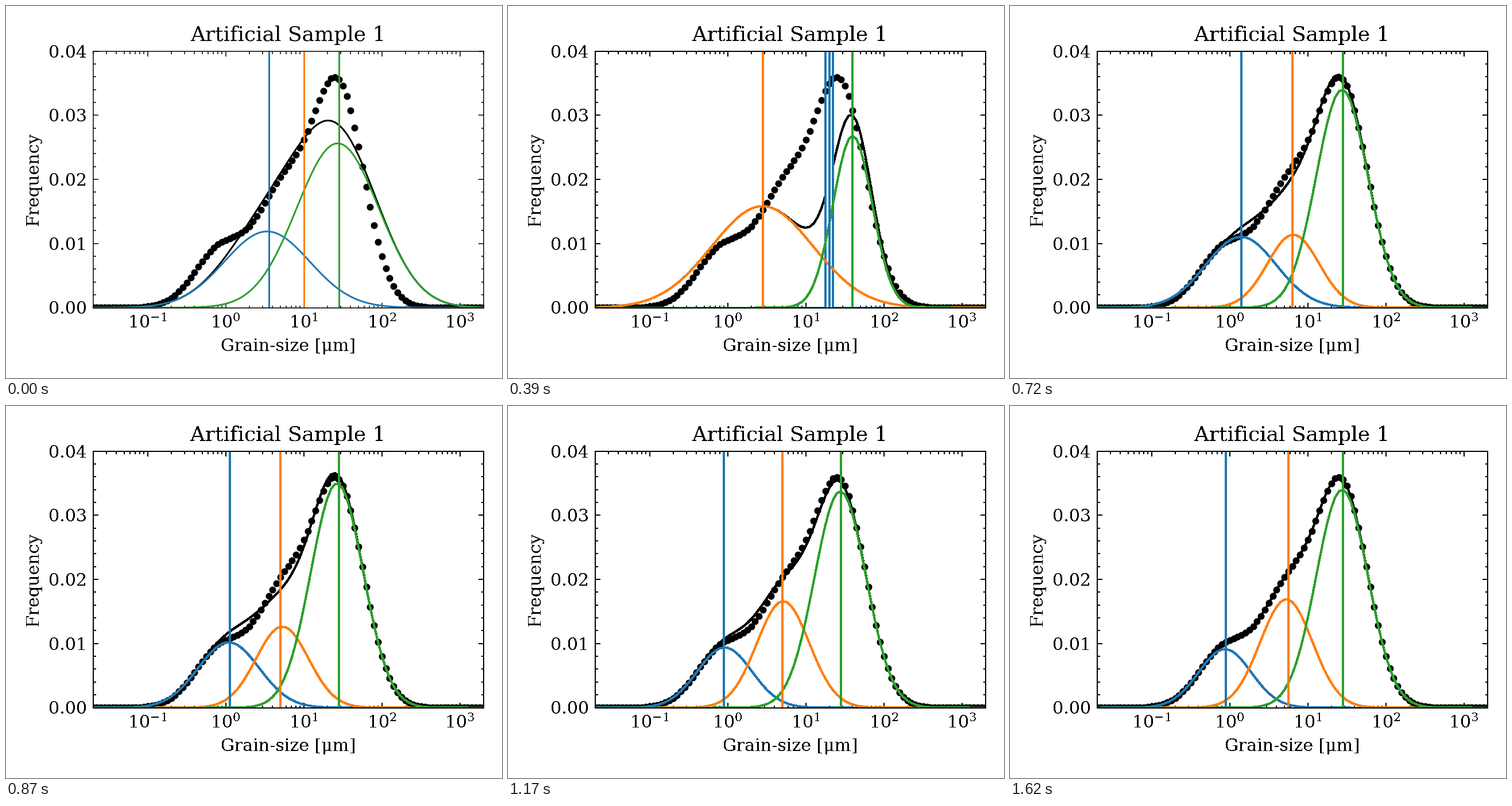
Animation of 864x648 px, one loop 1710 ms. Source, as a matplotlib script:

```python
import matplotlib.pyplot as plt
import numpy as np
from matplotlib.animation import FuncAnimation
from matplotlib.ticker import AutoMinorLocator, MultipleLocator

W, H, DPI = 864, 648, 216
STEPS, HOLD, INTERVAL = 55, 2, 30
COLORS = ["#1f77b4", "#ff7f0e", "#2ca02c"]

plt.rcParams.update({
    "font.family": "DejaVu Serif",
    "mathtext.fontset": "dejavuserif",
    "font.size": 10,
    "axes.linewidth": 0.5,
    "lines.linewidth": 1.0,
})
for axis, far in (("xtick", "top"), ("ytick", "right")):
    plt.rcParams.update({
        f"{axis}.direction": "in",
        f"{axis}.{far}": True,
        f"{axis}.minor.visible": True,
        f"{axis}.major.size": 3,
        f"{axis}.minor.size": 1.5,
        f"{axis}.major.width": 0.5,
        f"{axis}.minor.width": 0.5,
    })

# Grain-size classes: 20 per decade; centres and spreads count classes.
index = np.arange(101)
sizes = 0.02 * 10 ** (index / 20)


def guess(centres, spreads, first, last):
    """Three components; the middle one takes the remaining weight."""
    return np.array([centres, spreads, (first, 1 - first - last, last)])


START = guess((44.6, 54, 62.7), (10.9, 6.4, 10.5), 0.325, 0.675)
WIDE = guess((42.35, 54, 60.9), (18.4, 6.4, 8.7), 0.468, 0.532)
SPIKE = guess((60, 42.9, 66), (0.06, 12.95, 5), 0.15, 0.336)
ROUGH = guess((41.25, 53.65, 63.9), (11.4, 6.4, 6.2), 0.35, 0.458)
FINAL = guess((32.72, 48.5, 62.79), (6.69, 6.7, 6.6), 0.1525, 0.5625)

SEARCH_STEPS = [0, 6, 13, 19]
SEARCH = [START, WIDE, SPIKE, ROUGH]


def state(step):
    """Search through the guesses, then settle with a damped swing."""
    if step <= SEARCH_STEPS[-1]:
        i = max(np.searchsorted(SEARCH_STEPS, step), 1)
        a, b = SEARCH_STEPS[i - 1:i + 1]
        t = (step - a) / (b - a)
        return (1 - t) * SEARCH[i - 1] + t * SEARCH[i]
    t = step - SEARCH_STEPS[-1]
    swing = np.exp(-t / 7) * np.cos(np.arange(3) * np.pi * t / 20)
    fit = FINAL + (ROUGH - FINAL) * swing
    return guess(fit[0], fit[1], fit[2, 0], fit[2, 2])


def component(centre, spread, weight):
    z = (index - centre) / spread
    return weight * np.exp(-z * z / 2) / (spread * np.sqrt(2 * np.pi))


fig = plt.figure(figsize=(W / DPI, H / DPI), dpi=DPI, facecolor="white")
ax = fig.add_axes([151.5 / W, 1 - 525.5 / H, 680 / W, 446.7 / H])
ax.set_xscale("log")
ax.set_xlim(0.02, 2000)
ax.set_ylim(0, 0.04)
ax.yaxis.set_major_locator(MultipleLocator(0.01))
ax.yaxis.set_minor_locator(AutoMinorLocator(5))
ax.yaxis.set_major_formatter("{x:.2f}")
ax.set_title("Artificial Sample 1")
ax.set_xlabel("Grain-size [μm]")
ax.set_ylabel("Frequency")

sample = sum(component(*p) for p in FINAL.T)
dots, = ax.plot(sizes, sample, "o", color="black", ms=3, mew=1)
total, = ax.plot(sizes, sample, color="black")
curves = [ax.plot(sizes, 0 * sizes, color=c)[0] for c in COLORS]
modes = [ax.axvline(1, color=c) for c in COLORS]


def set_edges(hard):
    """Smooth strokes at first, hard-edged ones afterwards."""
    frame_width = 2 / 3 if hard else 0.5
    for spine in ax.spines.values():
        spine.set_linewidth(frame_width)
    ax.tick_params(which="both", width=frame_width)
    for mode in modes:
        mode.set_linewidth(4 / 3 if hard else 1.0)
    labels = [ax.title, ax.xaxis.label, ax.yaxis.label,
              *ax.get_xticklabels(), *ax.get_yticklabels()]
    for artist in [dots, total, *curves, *labels]:
        artist.set_antialiased(not hard)


def update(frame):
    step = min(frame, STEPS - 1)
    set_edges(step > 0)
    fit = state(step)
    parts = [component(*p) for p in fit.T]
    total.set_ydata(sum(parts))
    for curve, mode, part, centre in zip(curves, modes, parts, fit[0]):
        curve.set_ydata(part)
        mode.set_xdata([sizes[round(centre)]] * 2)
    return [total, *curves, *modes]


anim = FuncAnimation(fig, update, frames=STEPS + HOLD, interval=INTERVAL,
                     repeat=True, repeat_delay=0, blit=False)
plt.show()
```
